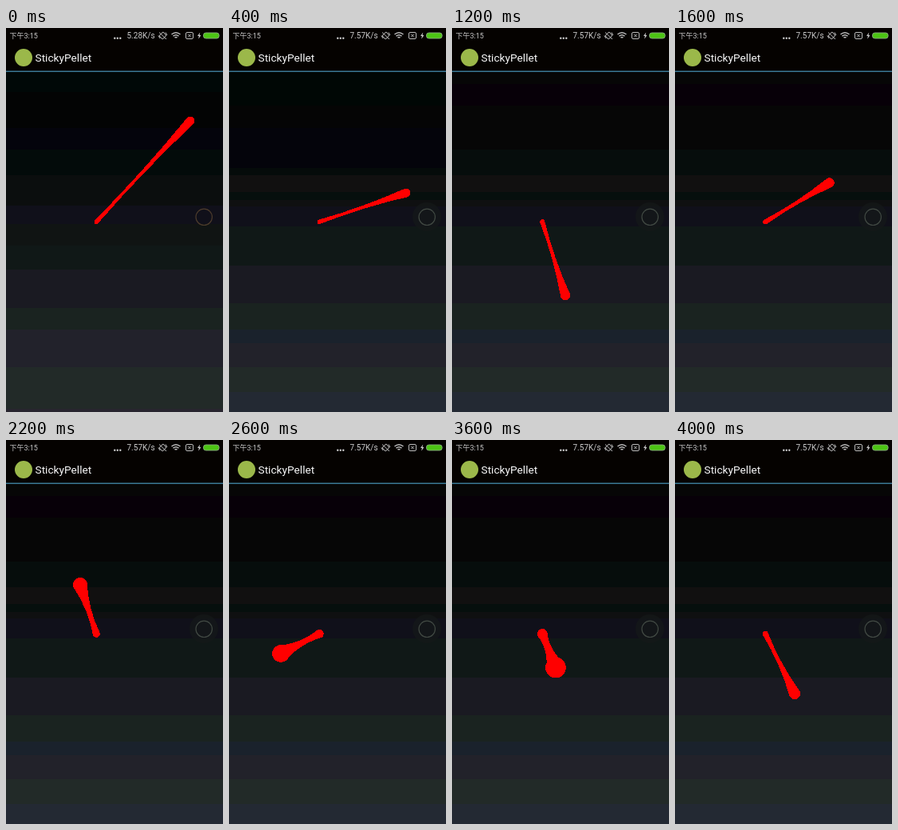
An HTML page that plays this animation: 272x480 px, repeating every 4200 ms.

```html
<!DOCTYPE html>
<html lang="en">
<head>
<meta charset="utf-8">
<title>StickyPellet</title>
<style>
  html, body { margin: 0; width: 100%; height: 100%; overflow: hidden; background: #000; }
  svg { display: block; width: 100vw; height: 100vh; }
  text { font-family: Roboto, "Noto Sans CJK SC", "Noto Sans CJK", sans-serif; }
</style>
</head>
<body>
<svg viewBox="0 0 272 480">
  <rect width="272" height="480" fill="#000"/>
  <g id="bands" shape-rendering="crispEdges"></g>

  <circle id="halo" cx="248" cy="236" r="18" fill="#141819" opacity=".75"/>
  <circle id="ring" cx="248.2" cy="236.3" r="10.2" fill="none" stroke-width="1.2"/>
  <path id="drop" fill="#f00" shape-rendering="crispEdges"/>

  <rect width="272" height="53.6" fill="#050200"/>
  <rect y="53.5" width="272" height="1.5" fill="#3b7996"/>
  <circle cx="22" cy="37" r="11" fill="#9bb84a"/>
  <text x="36.5" y="42" font-size="13.7" fill="#f8f8f8">StickyPellet</text>

  <g fill="#cacaca">
    <text x="4.5" y="13.3" font-size="9">下午3:15</text>
    <text id="speed" x="151.5" y="13.3" font-size="10"></text>
    <circle cx="136.3" cy="12.7" r="1.2"/>
    <circle cx="139.8" cy="12.7" r="1.2"/>
    <circle cx="143.3" cy="12.7" r="1.2"/>
    <path d="M243.2 5.5L240 10h1.9l-.7 3.8 3.2-4.8h-1.9z"/>
  </g>
  <g fill="none" stroke="#bcbcbc">
    <rect x="193" y="6.5" width="7" height="6" rx="1.2" transform="rotate(-45 196.5 9.5)"/>
    <path d="M192 5.5l9 8.5M191 9.5l2 3.5M200 5.5l2 3.5"/>
    <path d="M207.5 8q5.5-4.6 11 0M209.5 10.2q3.5-2.8 7 0M211.5 12.2q1.5-1.2 3 0" stroke-width="1.5"/>
    <rect x="225.5" y="5.5" width="9" height="8" rx="1.5"/>
    <path d="M228 7.5l4 4m0-4l-4 4"/>
  </g>
  <rect x="247.5" y="6" width="19.6" height="7" rx="3" fill="#4cc414" stroke="#8aa880" stroke-width=".9"/>
</svg>
<script>
const STEP = 200, LOOP = 4200;
const ANCHOR = { x: 113.3, y: 242.3 };

// Head of the drop, one point per step
const HEAD = [
  [231, 116], [235, 154], [222, 206], [201, 257], [176, 284], [151, 291], [142, 334],
  [174, 329], [193.5, 193.5], [163, 167], [124, 167], [93, 181], [70, 212], [65, 267],
  [70, 284], [85, 285], [100, 275], [114, 275], [130, 284.5], [142, 303], [150, 317]
];

// Background bands as [top, colour]
const LOWER = [
  [184, "#111010"], [205, "#060f0d"], [215, "#0f1011"], [223, "#10101a"], [248, "#101817"],
  [297, "#1a1a22"], [344, "#1a2320"], [377, "#1a222c"], [394, "#22222a"],
  [424, "#222a28"], [455, "#232933"]
];
const START = [
  [54, "#000807"], [80, "#030404"], [125, "#04040c"], [152, "#030b0a"],
  [184, "#0b0e0e"], [222, "#10101a"], [245, "#101413"], [272, "#101817"],
  [302, "#1a1a22"], [350, "#1a2320"], [377, "#22222b"], [424, "#222a28"], [476, "#28252f"]
];
const EARLY = [[54, "#000705"], [97, "#050505"], [125, "#04040b"], [175, "#050b0a"], ...LOWER];
const LATER = [[54, "#060606"], [70, "#070008"], [97, "#060606"], [152, "#060d0c"], ...LOWER];

const el = id => document.getElementById(id);

function bandMarkup(list) {
  return list.map(([y, fill], i) => {
    const end = i + 1 < list.length ? list[i + 1][0] : 480;
    return `<rect y="${y}" width="272" height="${end - y}" fill="${fill}"/>`;
  }).join("");
}

// Clockwise, to wind the same way as the neck
function disc(x, y, r) {
  const half = dx => `a${r} ${r} 0 0 1 ${dx} 0`;
  return `M${x - r} ${y}${half(2 * r)}${half(-2 * r)}Z`;
}

// Two full discs joined by a neck that pinches towards the middle
function dropPath([x, y]) {
  const dx = x - ANCHOR.x, dy = y - ANCHOR.y, dist = Math.hypot(dx, dy);
  const big = Math.max(5.5, Math.min(14, 585 / dist)), small = big / 2;
  const nx = -dy / dist, ny = dx / dist;
  const mid = `${ANCHOR.x + dx / 2} ${ANCHOR.y + dy / 2}`;
  const edge = (cx, cy, r) => `${cx + nx * r} ${cy + ny * r}`;
  const neck = `M${edge(ANCHOR.x, ANCHOR.y, -small)}Q${mid} ${edge(x, y, -big)}` +
    `L${edge(x, y, big)}Q${mid} ${edge(ANCHOR.x, ANCHOR.y, small)}Z`;
  return neck + disc(ANCHOR.x, ANCHOR.y, small) + disc(x, y, big);
}

let shown = -1;
function draw(time) {
  const step = Math.floor((time % LOOP) / STEP);
  if (step === shown) return;
  shown = step;
  const first = step === 0;
  el("bands").innerHTML = bandMarkup(first ? START : step < 6 ? EARLY : LATER);
  el("drop").setAttribute("d", dropPath(HEAD[step]));
  el("speed").textContent = first ? "5.28K/s" : "7.57K/s";
  el("ring").setAttribute("stroke", first ? "#4d3c2c" : "#414943");
  el("halo").setAttribute("visibility", first ? "hidden" : "visible");
}

let origin;
function tick(now) {
  origin ??= now;
  draw(now - origin);
  requestAnimationFrame(tick);
}
draw(0);
requestAnimationFrame(tick);
</script>
</body>
</html>
```
